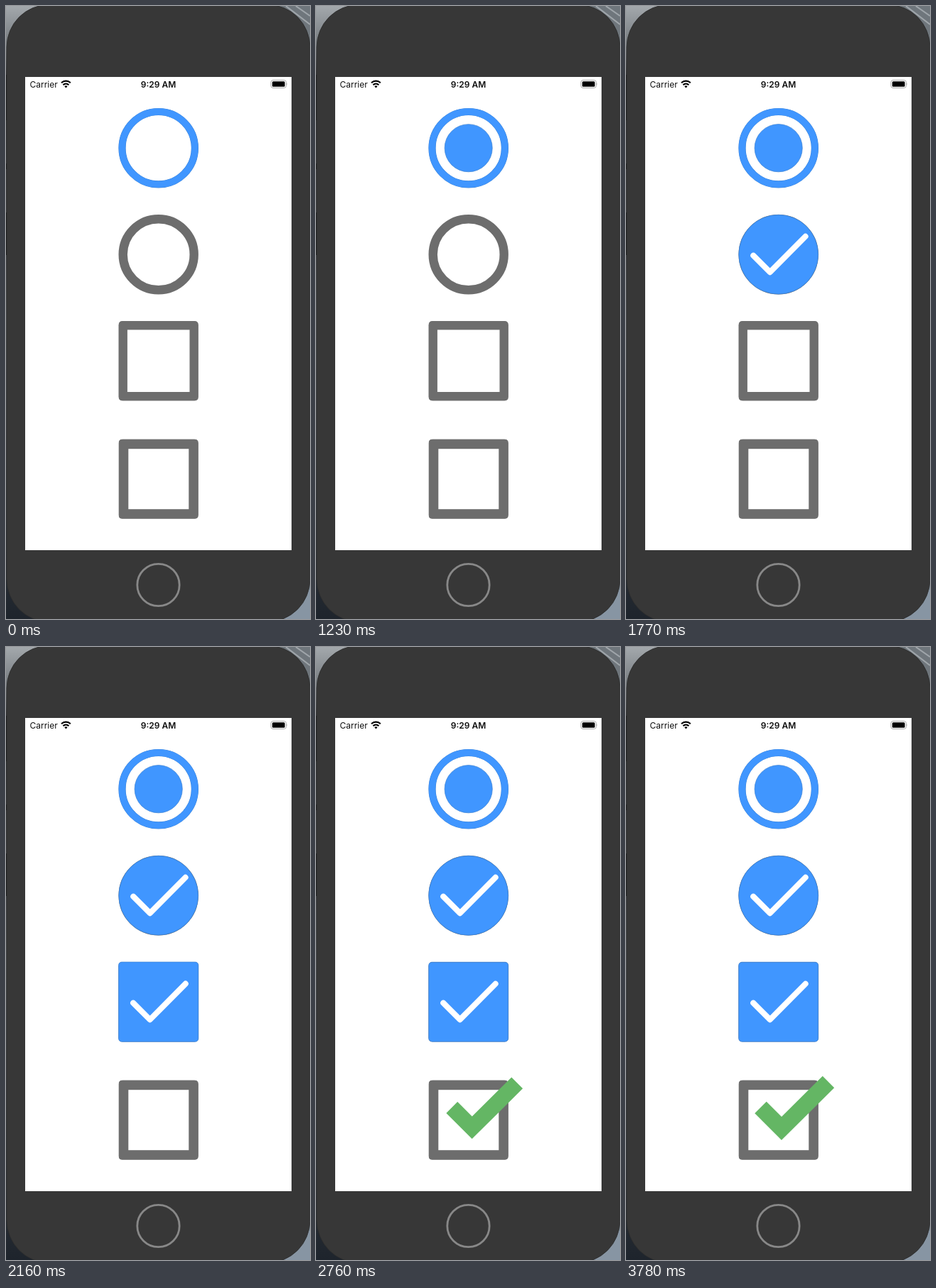
An HTML page that plays this animation: 428 px wide and 864 px high, repeating every 3810 ms.

```html
<!DOCTYPE html>
<html lang="en">
<head>
<meta charset="utf-8">
<title>Checkboxes</title>
<style>
  html, body { margin: 0; width: 100%; height: 100%; overflow: hidden; }
  svg { display: block; width: 428px; height: 864px; }
  text { font: 12px Inter, sans-serif; fill: #111; }
  .box { fill: none; stroke: #6d6d6d; }
  .fill { fill: #4096ff; stroke: #397fd0; stroke-width: .7; }
  .tick { fill: none; stroke: #fff; stroke-width: 8; stroke-linecap: round; stroke-linejoin: round; }
</style>
</head>
<body>
<svg viewBox="0 0 428 864">
  <defs>
    <linearGradient id="wall" x2="0" y2="1">
      <stop offset="0" stop-color="#a3a8ac"/>
      <stop offset=".07" stop-color="#70757a"/>
      <stop offset=".12" stop-color="#25272a"/>
      <stop offset=".5" stop-color="#555a60"/>
      <stop offset="1" stop-color="#1e242c"/>
    </linearGradient>
    <path id="tick" class="tick" d="M-35.5 1.5 L-12 25 L38 -25.5"/>
  </defs>

  <rect width="428" height="864" fill="url(#wall)"/>
  <path d="M370 0H428V70Z" fill="#6f767c"/>
  <path d="M394 0L428 26M408 0L428 14" stroke="#a0a6ab" stroke-width="2"/>
  <path d="M428 790V864H380Z" fill="#8795a3"/>
  <path d="M0 97v64M0 222v8M0 291v60" stroke="#17181a" stroke-width="2"/>
  <rect x="1" y="-2" width="427" height="870" rx="60" fill="#373737" stroke="#2b2b2b" stroke-width=".8"/>
  <rect x="27" y="100" width="375" height="667" fill="#fff"/>
  <circle cx="214.5" cy="816" r="29.7" fill="none" stroke="#888" stroke-width="2.8"/>

  <text x="33.5" y="115">Carrier</text>
  <text x="214.5" y="115" text-anchor="middle" font-weight="600" style="font-weight:600">9:29 AM</text>
  <g fill="none" stroke="#000" stroke-width="2.1">
    <path d="M78 108.3a9 9 0 0 1 12.8 0"/>
    <path d="M80.4 111.2a5.8 5.8 0 0 1 8 0"/>
  </g>
  <path d="M82.3 113.2a3 3 0 0 1 4.2 0L84.4 115.6Z"/>
  <rect x="373" y="104.5" width="21.5" height="11" rx="3" fill="none" stroke="#aaa"/>
  <rect x="374.8" y="106.2" width="17.8" height="7.6" rx="1.5"/>
  <path d="M395.6 108.3q1.6 1.7 0 3.4Z" fill="#aaa"/>

  <circle cx="214.7" cy="200.2" r="51.2" fill="none" stroke="#397fd0" stroke-width="10.2"/>
  <circle cx="214.7" cy="200.2" r="51.2" fill="none" stroke="#4096ff" stroke-width="9.4"/>
  <circle class="box" cx="214.7" cy="350.2" r="50" stroke-width="12.4"/>
  <rect class="box" x="164.7" y="450.2" width="100" height="100" stroke-width="12.4"/>
  <rect class="box" x="165.5" y="617.4" width="98.6" height="98.6" stroke-width="13.6"/>
  <!-- white notches round the outer corners of the boxes -->
  <g id="corners" fill="#fff"></g>

  <g class="mark" data-x="214.7" data-y="200.2" data-start="917">
    <circle class="fill" r="33.6"/>
  </g>
  <g class="mark" data-x="214.7" data-y="350.2" data-start="1457">
    <circle class="fill" r="56"/><use href="#tick"/>
  </g>
  <g class="mark" data-x="214.7" data-y="500.2" data-start="2023">
    <rect class="fill" x="-56" y="-56" width="112" height="112" rx="4.5"/><use href="#tick"/>
  </g>
  <g class="mark" data-x="237" data-y="650" data-start="2543">
    <path d="M-47.5 -1L-18 28.5L48 -37" fill="none" stroke="#64b664" stroke-width="23.3"/>
  </g>
</svg>
<script>
const LOOP = 3810, PERIOD = 175, DAMPING = 0.258;
const marks = [...document.querySelectorAll('.mark')];

let notches = '';
for (const y of [500.2, 666.7])
  for (const sx of [-1, 1])
    for (const sy of [-1, 1])
      notches += `<path transform="translate(214.7 ${y}) scale(${sx} ${sy})" d="M57 57H51.2A5 5 0 0 0 56.2 51.2H57Z"/>`;
document.getElementById('corners').innerHTML = notches.replaceAll('H51.2A5 5 0 0 0 56.2 51.2H57Z', 'H51.2V56.2A5 5 0 0 0 56.2 51.2H57Z');

// Underdamped spring from 0 to 1
function spring(t) {
  if (t <= 0) return 0;
  const phase = 2 * Math.PI * t / PERIOD;
  return 1 - Math.exp(-DAMPING * phase) * (Math.cos(phase) + DAMPING * Math.sin(phase));
}

function draw() {
  const t = performance.now() % LOOP;
  for (const mark of marks) {
    const { x, y, start } = mark.dataset;
    mark.setAttribute('transform', `translate(${x} ${y}) scale(${spring(t - start)})`);
  }
  requestAnimationFrame(draw);
}
draw();
</script>
</body>
</html>
```
